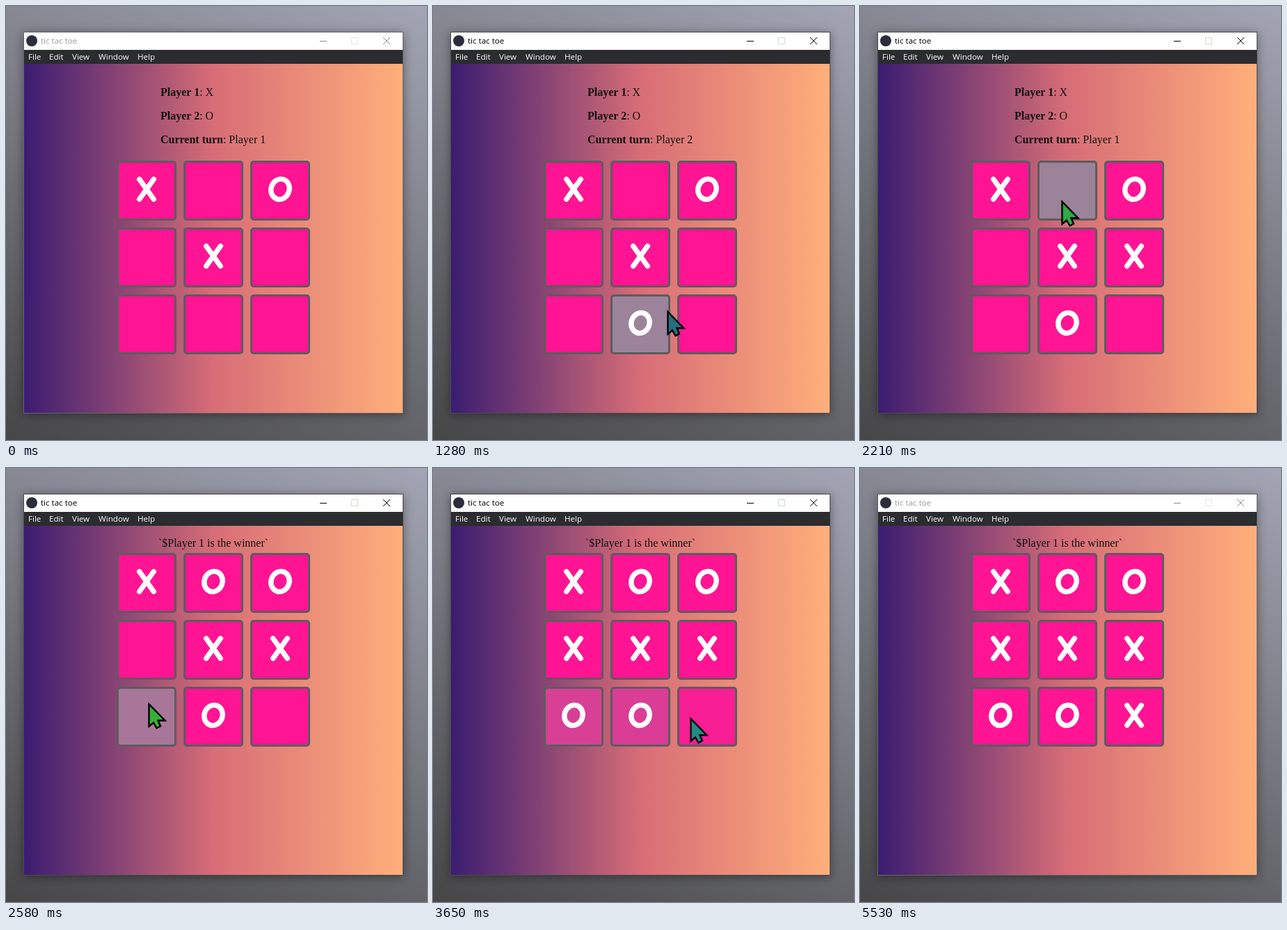
Write an HTML page that moves like this. It is 605x623 px and loops after 5.62 s.

```html
<!DOCTYPE html>
<html lang="en">
<head>
<meta charset="utf-8">
<title>tic tac toe</title>
<style>
  html, body { margin: 0; width: 100%; height: 100%; overflow: hidden; }
  body { background: linear-gradient(24deg, #464647, #a3a5b4); }
  svg { position: absolute; left: 0; top: 0; }
  .ui { font: 11.6px "Open Sans", sans-serif; }
  .page { font: 16px "Liberation Serif", serif; fill: #111; }
  .bold { font-weight: bold; }
  .frame { filter: drop-shadow(0 2px 7px rgba(0, 0, 0, .4)); }
  .mark { fill: none; stroke: #fff; stroke-width: 7.4; stroke-linecap: round; }
</style>
</head>
<body>
<svg width="605" height="623" viewBox="0 0 605 623">
  <defs>
    <linearGradient id="sunset">
      <stop offset="0" stop-color="#3a1c71"/>
      <stop offset=".5" stop-color="#d76d77"/>
      <stop offset="1" stop-color="#ffaf7b"/>
    </linearGradient>
  </defs>

  <rect id="edge" class="frame" x="25" y="37" width="546" height="548"/>
  <rect x="26" y="38" width="544" height="25" fill="#fff"/>
  <rect x="26" y="63" width="544" height="20" fill="#2a2c2f"/>
  <rect x="26" y="83" width="544" height="501" fill="url(#sunset)"/>

  <circle cx="37" cy="50" r="8" fill="#2b2e3a"/>
  <text id="caption" class="ui" x="50" y="54">tic tac toe</text>
  <path id="buttons" d="M451 50.5h10M542 45l10 10m0-10l-10 10" fill="none"/>
  <rect id="maximize" x="496.5" y="45.5" width="9" height="9" fill="none"/>
  <g class="ui" fill="#fff">
    <text x="32" y="77">File</text>
    <text x="62" y="77">Edit</text>
    <text x="95" y="77">View</text>
    <text x="133" y="77">Window</text>
    <text x="189" y="77">Help</text>
  </g>

  <g id="info" class="page">
    <text x="222" y="129"><tspan class="bold">Player 1</tspan>: X</text>
    <text x="222" y="163"><tspan class="bold">Player 2</tspan>: O</text>
    <text x="222" y="197"><tspan class="bold">Current turn</tspan>: Player <tspan id="player"></tspan></text>
  </g>
  <text id="winner" class="page" x="298" y="113" text-anchor="middle">`$Player 1 is the winner`</text>

  <g id="board"></g>
  <path id="cursor" d="M1.5 2V34L8 28.5L12.5 36.5L18 33.5L14.5 25.5H24.5Z"
        stroke="#000" stroke-width="2.4"/>
</svg>
<script>
const LOOP = 5620, TICK = 10, FADE = 250;
const ENTER = 450, BLUR = 5530, FIRST_CLICK = 1100, BEAT = 585;
const PITCH = 96, SIZE = 86, LEFT = 159, TOP = 222, SHIFT = 100;
const PINK = [255, 20, 147], GREY = [155, 131, 153];

// Cells in playing order, X and O alternating; the first three are already set.
const order = [0, 2, 4, 7, 5, 1, 3, 6, 8];
const PRESET = 3;
const clickTime = turn => FIRST_CLICK + BEAT * (turn - PRESET);
const WIN = clickTime(order.indexOf(1));

// Where the cursor slows down: [time, x, y]
const stops = [
  [ENTER, 528, 600], [930, 300, 438], [1280, 336, 437], [1600, 346, 434],
  [1740, 360, 326], [1910, 336, 311], [1950, 302, 297], [WIN, 288, 277],
  [2430, 204, 337], [2750, 204, 337], [2880, 214, 272], [3120, 222, 337],
  [3440, 222, 343], [3780, 441, 366], [4060, 406, 358], [4140, 434, 359],
  [4420, 551, 380]
];

const glyphs = {
  X: '<path class="mark" d="M-10.3 -16.3L10.3 12.3M10.3 -16.3L-10.3 12.3"/>',
  O: '<ellipse class="mark" cy="-2" rx="13" ry="14.8" transform="rotate(20 0 -2)"/>'
};

const $ = id => document.getElementById(id);
const mix = (a, b, k) => a.map((v, i) => v + (b[i] - v) * k);
const show = (node, on) => node.setAttribute('visibility', on ? 'visible' : 'hidden');

function cursorAt(t) {
  const next = stops.findIndex(stop => stop[0] > t);
  if (next < 0) return stops[stops.length - 1].slice(1);
  const [from, ...a] = stops[next - 1], [to, ...b] = stops[next];
  const u = (t - from) / (to - from);
  return mix(a, b, u * u * (3 - 2 * u));
}

function hoveredCell(t) {
  if (t < ENTER || t >= BLUR) return -1;
  const [x, y] = cursorAt(t);
  const dx = x - LEFT, dy = y - TOP + (t >= WIN ? SHIFT : 0);
  const col = Math.floor(dx / PITCH), row = Math.floor(dy / PITCH);
  const inside = col >= 0 && col < 3 && row >= 0 && row < 3
    && dx - col * PITCH <= SIZE && dy - row * PITCH <= SIZE;
  return inside ? row * 3 + col : -1;
}

// A linear fade equals the share of the last FADE ms spent over the cell.
function hoverLevels(t) {
  const levels = order.map(() => 0);
  for (let age = 0; age < FADE; age += TICK) {
    const hit = hoveredCell(t - age);
    if (hit >= 0) levels[hit] += TICK / FADE;
  }
  return levels;
}

function cursorColor(t) {
  const wave = Math.cos(2 * Math.PI * (t - 2600) / 3200);
  return `hsl(${158 - 38 * wave}, 55%, ${38 + 7 * wave}%)`;
}

const cells = order.map((_, cell) => {
  const turn = order.indexOf(cell);
  const x = LEFT + cell % 3 * PITCH + SIZE / 2;
  const y = TOP + Math.floor(cell / 3) * PITCH + SIZE / 2;
  $('board').insertAdjacentHTML('beforeend', `<g transform="translate(${x} ${y})">
    <rect x="-41.5" y="-41.5" width="83" height="83" rx="3.5" stroke="#5e5b5e" stroke-width="3"/>
    ${glyphs[turn % 2 ? 'O' : 'X']}</g>`);
  const [box, mark] = $('board').lastElementChild.children;
  return { box, mark, placed: turn < PRESET ? 0 : clickTime(turn) };
});

function draw(t) {
  const active = t >= FIRST_CLICK && t < BLUR, won = t >= WIN;
  $('edge').setAttribute('fill', active ? '#4b4b4f' : '#65656a');
  $('caption').setAttribute('fill', active ? '#000' : '#999');
  $('buttons').setAttribute('stroke', active ? '#000' : '#888');
  $('maximize').setAttribute('stroke', active ? '#cddfca' : '#e2e6e4');

  show($('info'), !won);
  show($('winner'), won);
  const played = cells.filter(cell => t >= cell.placed).length;
  $('player').textContent = played % 2 ? 1 : 2;
  $('board').setAttribute('transform', `translate(0 ${won ? -SHIFT : 0})`);

  const levels = hoverLevels(t);
  cells.forEach(({ box, mark, placed }, i) => {
    box.setAttribute('fill', `rgb(${mix(PINK, GREY, levels[i]).map(Math.round)})`);
    show(mark, t >= placed);
  });

  const pointing = t >= ENTER && t < BLUR;
  show($('cursor'), pointing);
  if (!pointing) return;
  $('cursor').setAttribute('transform', `translate(${cursorAt(t).map(Math.round)})`);
  $('cursor').setAttribute('fill', cursorColor(t));
}

const start = performance.now();
function tick() {
  const t = (performance.now() - start) % LOOP;
  draw(Math.floor(t / TICK) * TICK);
  requestAnimationFrame(tick);
}
tick();
</script>
</body>
</html>
```
